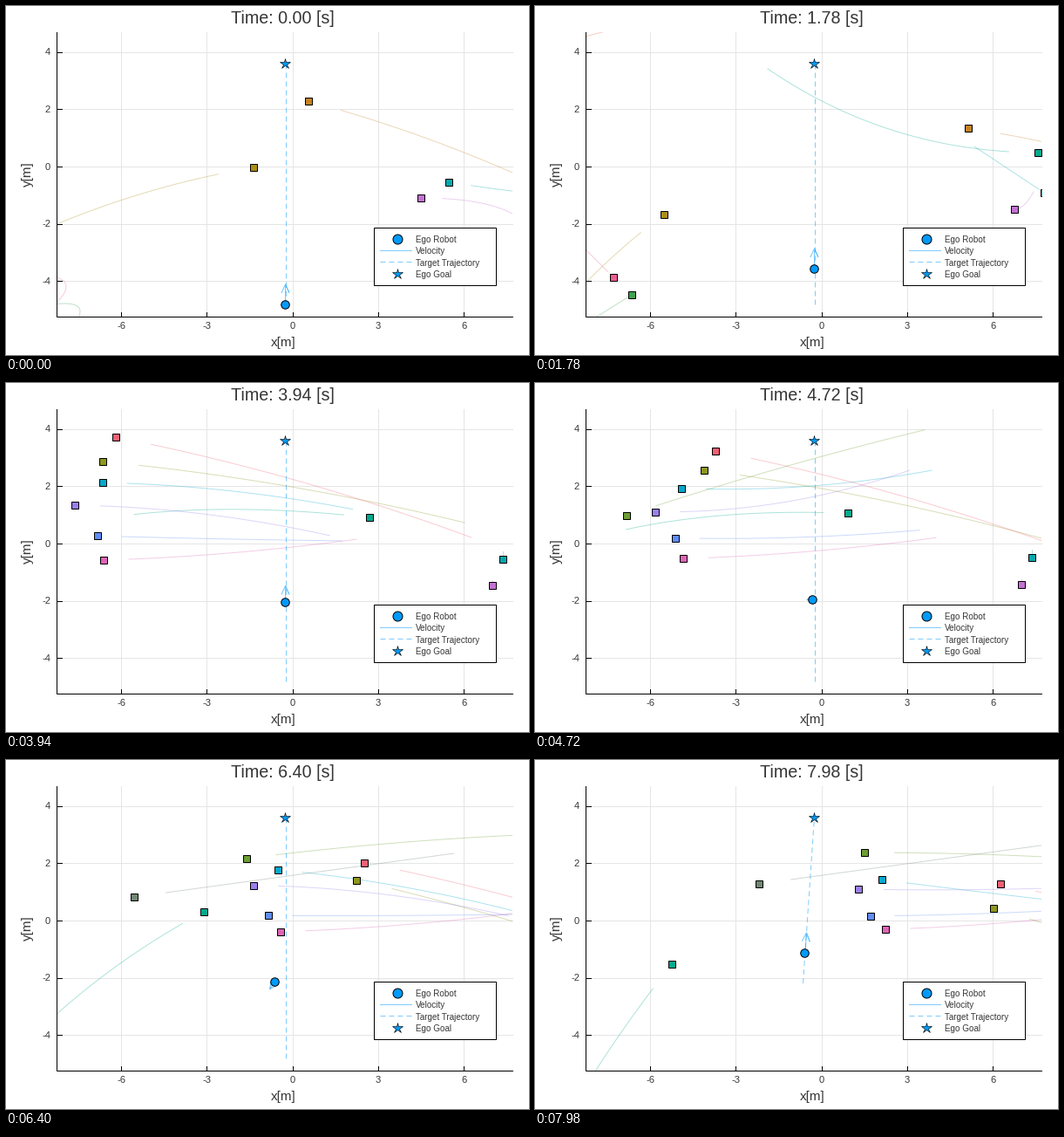
Recreate the animation shown at these times as a matplotlib script. Size 600 px wide and 400 px high, loop 8000 ms.

```python
import numpy as np
import matplotlib.pyplot as plt
from matplotlib.animation import FuncAnimation
from matplotlib.patches import Rectangle

W, H, DPI = 600, 400, 100
FRAMES, INTERVAL = 400, 20
FRAMES_PER_STEP = 20                # walkers are observed every 0.4 s
PX = 72 / DPI                       # one pixel in points
LEFT, TOP, RIGHT, BOTTOM = 58, 30, 581, 356
BLUE, INK = "#009AFA", "#363636"
START, RESTART, GOAL = np.array([(320, 342), (307, 256), (320, 66)], float)
STOP_T, RESTART_T, SPEED = 4.1, 6.6, 23

plt.rcParams["font.family"] = "Liberation Sans"
fig = plt.figure(figsize=(W / DPI, H / DPI), dpi=DPI, facecolor="white")
ax = fig.add_axes([0, 0, 1, 1])
ax.set_xlim(0, W)
ax.set_ylim(H, 0)
ax.axis("off")
view = Rectangle((LEFT, TOP), RIGHT - LEFT, BOTTOM - TOP, transform=ax.transData)


def stroke(xs, ys, color="black", z=1, clip=False, **kw):
    line, = ax.plot(xs, ys, color=color, lw=PX, zorder=z, **kw)
    if clip:
        line.set_clip_path(view)
    return line


def marker(x, y, shape, size, color, z, edge=1.0, clip=False):
    dot, = ax.plot([x], [y], shape, ms=size * PX, mfc=color, mec="black",
                   mew=edge * PX, zorder=z)
    if clip:
        dot.set_clip_path(view)
    return dot


def label(x, y, text, size, ha="center", va="center_baseline", **kw):
    return ax.text(x, y, text, fontsize=size, color=INK, ha=ha, va=va, **kw)


def draw_axes():
    for v in (-6, -3, 0, 3, 6):
        x = 328.8 + 32.77 * v
        stroke([x, x], [TOP, BOTTOM], "#e5e5e5", z=0)
        stroke([x, x], [BOTTOM, BOTTOM - 5])
        label(x, 365.5, str(v), 8)
    for v in (-4, -2, 0, 2, 4):
        y = 184 - 32.8 * v
        stroke([LEFT, RIGHT], [y, y], "#e5e5e5", z=0)
        stroke([LEFT, LEFT + 6], [y, y])
        label(51, y - 0.5, str(v), 8, ha="right")
    stroke([LEFT, LEFT, RIGHT], [TOP, BOTTOM, BOTTOM], z=9)
    label(318, 384.5, "x[m]", 11)
    label(24.5, 192.5, "y[m]", 11, va="center", rotation=90)


def draw_legend():
    ax.add_patch(Rectangle((422, 254), 140, 66, fc="white", ec="black",
                           lw=PX, zorder=10))
    marker(449, 267, "o", 11, BLUE, 11)
    stroke([429, 465], [280, 280], BLUE, z=11, alpha=0.5)
    stroke([429, 465], [293, 293], BLUE, z=11, alpha=0.5, dashes=(6, 4))
    marker(449, 307, "*", 13, BLUE, 11, 0.6)
    names = ("Ego Robot", "Velocity", "Target Trajectory", "Ego Goal")
    for i, name in enumerate(names):
        label(469.5, 267 + 13.3 * i, name, 7.1, ha="left", zorder=11)


def swing(n):
    return np.cos(2 * np.pi * (n - 17) / 9)


class Walker:
    """Moves once per step; the line forecasts the next ten steps."""

    ahead = np.linspace(1, 10, 25)[:, None]

    def __init__(self, color, first, last, pos, vel, acc=(0, 0),
                 lean=(0, 0), sway=0, jerk=0):
        self.first, self.last = first, last
        self.pos, self.vel, self.acc, self.lean, self.sway, self.jerk = map(
            np.array, (pos, vel, acc, lean, (0, sway), (0, jerk)))
        self.path = stroke([], [], color, z=2, clip=True, alpha=0.32)
        self.dot = marker(0, 0, "s", 8, color, 4, clip=True)

    def update(self, n):
        shown = self.first <= n <= self.last
        self.path.set_visible(shown)
        self.dot.set_visible(shown)
        if not shown:
            return
        m = n - self.first
        tilt = self.sway * swing(n)
        p = (self.pos + self.vel * m + self.acc * m ** 2 / 2
             + self.jerk * m ** 3 / 6 - 4 * tilt)
        vel = self.vel + self.acc * m + self.jerk * m ** 2 / 2
        bend = np.clip(self.acc + self.jerk * m, -2.5, 0.6) + self.lean + tilt
        curve = p + vel * self.ahead + bend * self.ahead ** 2 / 2
        self.path.set_data(curve[:, 0], curve[:, 1])
        self.dot.set_data([p[0]], [p[1]])


draw_axes()
draw_legend()
title = label(317.5, 12, "", 14.2)

GREEN, PURPLE, TEAL, PINK = "#3EA44E", "#C371D2", "#00AAAE", "#ED5E93"
walkers = [
    # early passers-by
    Walker("#C68225", 0, 6, (347, 109), (37.5, 10), (0, -1.1), (0, 2.1)),
    Walker("#AC8E18", 0, 8, (284, 185), (-41, 7), (3.5, 3.25), (0, 0.9)),
    Walker("#EB6546", 3, 7, (18, 45), (13, -3.3)),
    Walker(PINK, 0, 3, (30, 308), (25, 0), (-5, 0.4), (-5.5, 2.4)),
    Walker(PINK, 4, 6, (90, 311), (-6, -6)),
    Walker(GREEN, 0, 3, (35, 345), (20, -4), (-0.5, 0.2), (-3.5, 1.8)),
    Walker(GREEN, 4, 6, (111, 331), (-4, 2.5)),
    Walker(GREEN, 7, 8, (102, 318), (5, -15), lean=(0.8, -0.9)),
    # the pair that comes to a halt on the right
    Walker(PURPLE, 0, 3, (476, 220), (26, 0), (-3.7, 1.6), (0, 0.6)),
    Walker(PURPLE, 4, 6, (550, 233), (2.2, 0), lean=(0, -0.4)),
    Walker(PURPLE, 7, 14, (558, 233), (0, -0.6)),
    Walker(TEAL, 0, 3, (508, 202), (27, 4), (-4, -0.5)),
    Walker(TEAL, 4, 6, (584, 214), (-5, -3.3), lean=(-0.6, -0.4)),
    Walker(TEAL, 7, 14, (570, 204), (0, -0.9)),
    # one going left, then the group going right
    Walker("#00A98D", 4, 19, (577, 168), (-34, -0.1), (0.8, -1.9), jerk=0.5),
    Walker("#8E971E", 8, 19, (69.5, 86.4), (41.5, 3.2), (0, 0.8)),
    Walker("#00A9CC", 8, 19, (82, 116.5), (28.7, 0.3), (0, 0.3), (0, -0.5), 0.9),
    Walker("#9B7FE9", 8, 19, (50, 143.5), (29.2, 0.5), lean=(0, -0.4), sway=1.3),
    Walker("#618DF6", 8, 19, (77, 175), (28, 0.9), (0, -0.1), (0, -0.1), 0.2),
    Walker("#F06073", 8, 19, (85, 54), (40.8, 8), lean=(0, 0.7)),
    Walker("#DD65B6", 8, 19, (83, 204), (29, -0.9), lean=(0, -0.3)),
    Walker("#6C9F33", 10, 19, (70.5, 163.8), (34.2, -12.7), (0, 1.4), (0, -0.3)),
    Walker("#718772", 14, 19, (73.5, 167), (36.7, -5)),
]

plan = stroke([], [], BLUE, z=3, alpha=0.5, dashes=(6, 4))
arrow = stroke([], [], BLUE, z=5, alpha=0.55)
marker(*GOAL, "*", 12, BLUE, 6, 0.6)
ego = marker(0, 0, "o", 9.5, BLUE, 7)


def ego_state(t):
    """Position and velocity: cruise, back off, then head for the goal."""
    if t < STOP_T:
        slow = np.clip((4.35 - t) / 0.5, 0, 1)
        return START - (0, SPEED * t), np.array((0, -SPEED * slow))
    if t < RESTART_T:
        u = (t - STOP_T) / (RESTART_T - STOP_T)
        halt = START - (0, SPEED * STOP_T)
        mix = np.array((u ** 1.2, u ** 3))
        return halt + (RESTART - halt) * mix, np.array((-6, 10 * u ** 2))
    heading = (GOAL - RESTART) / np.hypot(*(GOAL - RESTART))
    return RESTART + heading * 25.4 * (t - RESTART_T), heading * SPEED


def update_ego(t):
    pos, vel = ego_state(t)
    ego.set_data([pos[0]], [pos[1]])
    origin = START if t < RESTART_T else RESTART
    plan.set_data(*zip(origin + (0.5, 0), GOAL + (0.5, 0)))

    size = np.hypot(*vel)
    unit = vel / size
    head = min(9.5, 0.9 * size)
    side = 0.46 * head * np.array((-unit[1], unit[0]))
    tip = pos + (0.5, 0) + vel
    neck = tip - head * unit
    arrow.set_data(*zip(pos + (0.5, 0), tip, neck + side, tip, neck - side))


def update(k):
    t = k * INTERVAL / 1000
    title.set_text(f"Time: {t:.2f} [s]")
    for w in walkers:
        w.update(k // FRAMES_PER_STEP)
    update_ego(t)
    return []


anim = FuncAnimation(fig, update, frames=FRAMES, init_func=lambda: update(0),
                     interval=INTERVAL, repeat=True, repeat_delay=0,
                     cache_frame_data=False)
plt.show()
```
